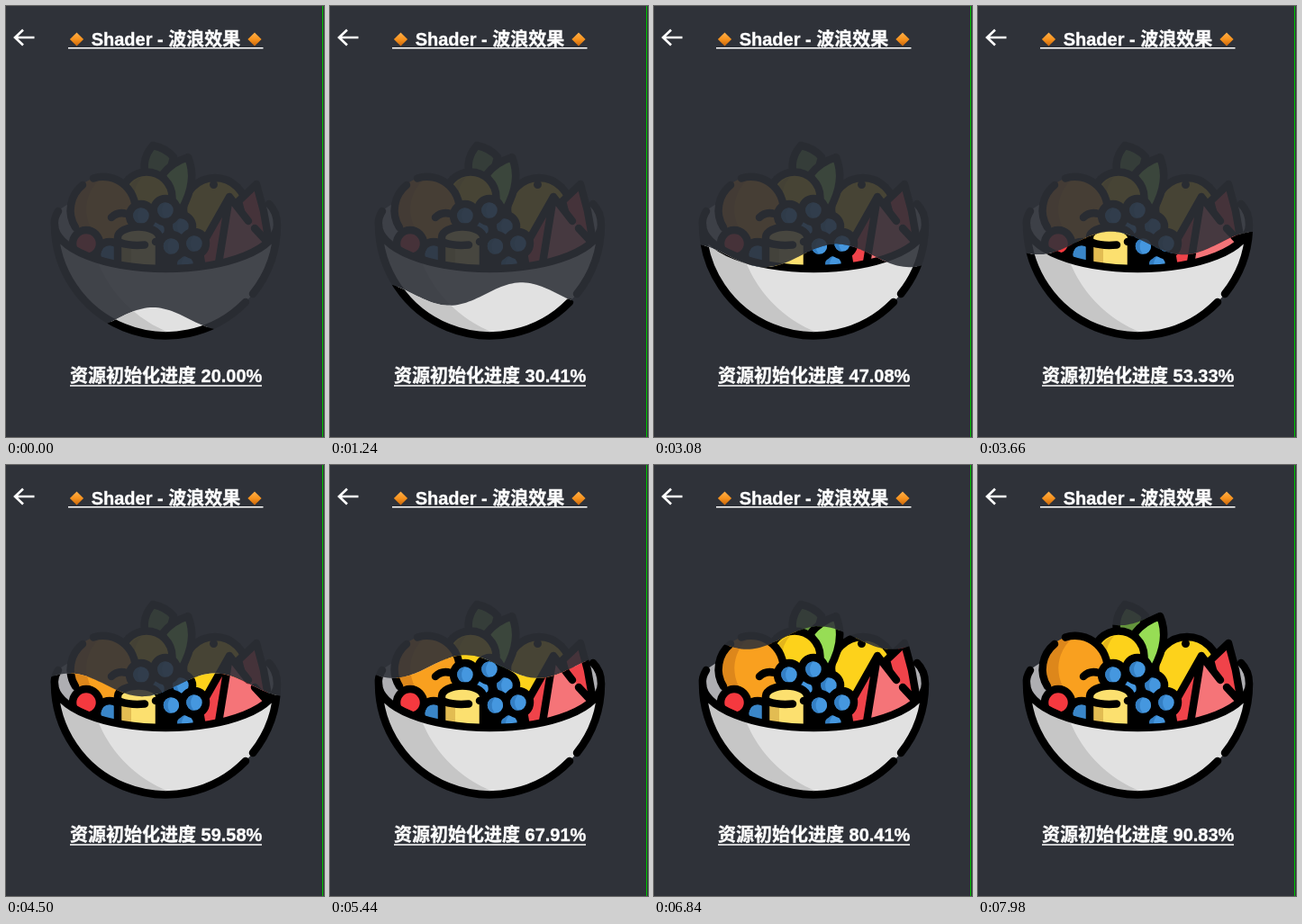
An HTML page for the animation above (8 s loop, 353 by 479 pixels).

```html
<!DOCTYPE html>
<html lang="zh-CN">
<head>
<meta charset="utf-8">
<title>Shader - 波浪效果</title>
<style>
  html, body { margin: 0; width: 100%; height: 100%; overflow: hidden; background: #2f3239; }
  svg { display: block; width: 100%; height: 100%; }
  text {
    font: bold 20px "Liberation Sans", "Noto Sans CJK SC", "Noto Sans CJK", sans-serif;
    fill: #fff; stroke: #fff; stroke-width: .35;
  }
  .ink { stroke: #000; stroke-width: 8.5; stroke-linecap: round; stroke-linejoin: round; }
  .line { fill: none; }
</style>
</head>
<body>
<svg viewBox="0 0 353 479" preserveAspectRatio="none">
  <defs>
    <clipPath id="water"><path id="wave"/></clipPath>
    <linearGradient id="amber" x2="0" y2="1">
      <stop offset="0" stop-color="#ffb04a"/>
      <stop offset=".5" stop-color="#f7931e"/>
      <stop offset="1" stop-color="#c9660c"/>
    </linearGradient>
    <path id="gem" d="M0-7.600L7.600 0 0 7.600-7.600 0z" fill="url(#amber)"/>
    <g id="berry">
      <circle r="13" class="ink" fill="#4597df"/>
      <path d="M0-8.800A8.800 8.800 0 0 0 0 8.800A12 12 0 0 1 0-8.800" fill="#347fc4"/>
    </g>

    <g id="salad">
      <!-- inside of the bowl -->
      <path d="M57 228Q50 242 60 262L110 287H245L296 262Q304 240 292 220L270 214H78Z" fill="#aeaeb2"/>
      <path d="M80 235H275L282 268 235 288H120L78 270Z"/>

      <!-- lemons, leaves and orange -->
      <circle class="ink" cx="232" cy="226" r="35" fill="#fdd21b"/>
      <circle cx="230.500" cy="198.500" r="4.500"/>
      <path class="ink" d="M155 188Q150 170 163 155 178 158 186 168L180 190Z" fill="#64953c"/>
      <path class="ink" d="M174 187Q184 174 202 168 213 194 195 226L180 222Z" fill="#97dd55"/>
      <circle class="ink" cx="156" cy="213" r="28.500" fill="#fdd21b"/>
      <path d="M151 190A24 24 0 0 0 151 236A34 34 0 0 1 151 190" fill="#e3b51b"/>
      <circle cx="108" cy="226" r="36" fill="#f9a01f"/>
      <path d="M108 190A36 36 0 0 0 108 262A44 44 0 0 1 108 190" fill="#dd871b"/>
      <path class="ink line" d="M97 191.500A36 36 0 0 1 143 233M85 199A36 36 0 0 0 77 246"/>

      <!-- melon slices -->
      <path class="ink" d="M258 217 278 198 286 228 292 262 270 262Z" fill="#f0434a"/>
      <path d="M248 212 218 266 222 290 262 284 292 264Z" fill="#f0434a"/>
      <path d="M248 212 236 290 265 282 291 264Z" fill="#f57478"/>
      <path class="ink line" d="M222 258 248 212 269 239M248 212 236 286M276 247 290 262"/>

      <!-- berries -->
      <path d="M134 236 150 222 178 218 200 236 208 250 216 262 212 290 165 290Z"/>
      <use href="#berry" x="167" y="249"/>
      <use href="#berry" x="194" y="245"/>
      <use href="#berry" x="150" y="233"/>
      <use href="#berry" x="177" y="227"/>
      <use href="#berry" x="199" y="287"/>
      <use href="#berry" x="183.500" y="267"/>
      <use href="#berry" x="209" y="264"/>
      <path class="ink line" d="M117 235Q124 228 134 231"/>

      <!-- cherry, blueberry and banana piece -->
      <circle class="ink" cx="115" cy="276" r="14" fill="#3a86c8"/>
      <circle class="ink" cx="89" cy="264" r="15" fill="#f5393f"/>
      <path d="M124 257A23 11.500 0 0 1 170 257V294H124Z" fill="#fce06f"/>
      <path d="M124 260Q130 265 139 266V294H124Z" fill="#e2bc52"/>
      <path class="ink line" d="M124 290V257A23 11.500 0 0 1 170 257V290M127 263Q138 267 154 265.500M166 262H170"/>

      <!-- bowl -->
      <path d="M54 243A123.500 49 0 0 0 301 243A123.500 123.500 0 0 1 54 243" fill="#e1e1e1"/>
      <path d="M54 243Q64 271 101 282A140 140 0 0 0 190 366A123.500 123.500 0 0 1 54 243" fill="#c6c6c6"/>
      <path class="ink line" d="M58 228Q53 236 54 243A123.500 49 0 0 0 301 243Q301 229 292 220
        M54 243A123.500 123.500 0 0 0 266 329M274 320A123.500 123.500 0 0 0 301 243"/>
    </g>
  </defs>

  <rect width="353" height="479" fill="#2f3239"/>
  <path d="M19 26.500 10 35 19 43.500M10.500 35H31.500" fill="none" stroke="#fff" stroke-width="2.600"/>
  <use href="#gem" x="78.500" y="37"/>
  <text x="94.700" y="43.500">Shader - 波浪效果</text>
  <use href="#gem" x="276" y="37"/>
  <path d="M69 46.800H285.500M71 422H284" stroke="#fff" stroke-width="1.600"/>

  <use href="#salad" opacity=".115"/>
  <g clip-path="url(#water)"><use href="#salad"/></g>
  <text id="label" x="71" y="418"></text>
  <rect x="351" width="1" height="479" fill="#00c800"/>
</svg>

<script>
  const LOOP = 8000, SIZE = 256, FPS = 24;
  const wave = document.getElementById('wave');
  const label = document.getElementById('label');

  // Each 140 ms holds three steps, lasting 20, 100 and 20 ms.
  function stepAt(ms) {
    const rest = ms % 140;
    return 3 * Math.floor(ms / 140) + (rest < 20 ? 0 : rest < 120 ? 1 : 2);
  }

  function wavePath(step) {
    const seconds = step / FPS;
    const level = 399 - SIZE * (0.2 + 0.1 * seconds);
    let d = 'M40 400';
    for (let x = 40; x <= 316; x += 3) {
      const phase = 10 * (x - 163) / SIZE + 4 * seconds;
      d += `L${x} ${(level - 0.05 * SIZE * Math.cos(phase)).toFixed(2)}`;
    }
    return d + 'V400Z';
  }

  // The readout refreshes on every fifth step and truncates.
  function percent(step) {
    const value = 20 + Math.floor((step + 1) / 5) * 50 / FPS;
    return (Math.floor(value * 100 + 1e-6) / 100).toFixed(2);
  }

  let start, shown;
  function draw(now) {
    start ??= now;
    const step = stepAt((now - start) % LOOP);
    if (step !== shown) {
      shown = step;
      wave.setAttribute('d', wavePath(step));
      label.textContent = `资源初始化进度 ${percent(step)}%`;
    }
    requestAnimationFrame(draw);
  }
  draw(performance.now());
</script>
</body>
</html>
```
